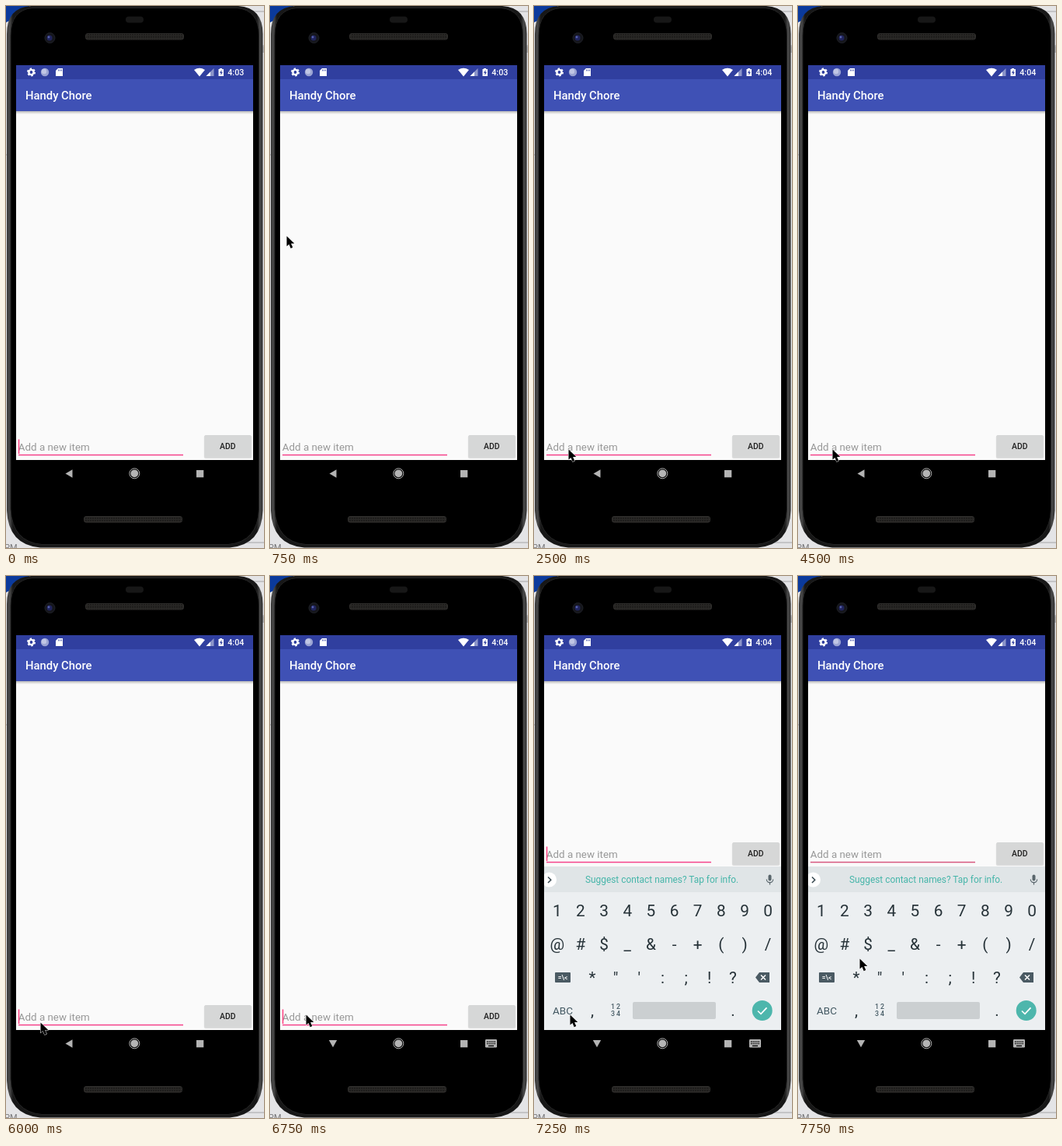
Write an HTML page that moves like this. It is 332 px wide and 696 px high and loops after 8000 ms.

```html
<!DOCTYPE html>
<html lang="en">
<head>
<meta charset="utf-8">
<title>Todo app on a phone</title>
<style>
  html, body { margin: 0; width: 100%; height: 100%; overflow: hidden; background: #e4e4e6; }
  svg { display: block; width: 332px; height: 696px; }
  text { font-family: Roboto, "Noto Sans", sans-serif; }
  .medium { font-weight: 500; }
  .key { font-size: 20.8px; fill: #263238; text-anchor: middle; }
  .hidden { visibility: hidden; }
</style>
</head>
<body>
<svg viewBox="0 0 332 696">
  <defs>
    <linearGradient id="rim" x1="0" x2="1" y1="0" y2="0">
      <stop offset="0" stop-color="#3a3a3a"/>
      <stop offset=".012" stop-color="#4a4a4a"/>
      <stop offset=".024" stop-color="#171717"/>
      <stop offset=".976" stop-color="#171717"/>
      <stop offset=".988" stop-color="#4a4a4a"/>
      <stop offset="1" stop-color="#303030"/>
    </linearGradient>
    <linearGradient id="shade" x1="0" x2="0" y1="0" y2="1">
      <stop offset="0" stop-opacity=".26"/>
      <stop offset="1" stop-opacity="0"/>
    </linearGradient>
    <pattern id="mesh" width="3" height="3" patternUnits="userSpaceOnUse">
      <rect width="3" height="3" fill="#292826"/>
      <rect width="2" height="1.5" fill="#1a1918"/>
    </pattern>
    <clipPath id="screen"><rect x="13" y="76" width="305" height="507"/></clipPath>
  </defs>

  <!-- desktop -->
  <rect width="332" height="696" fill="#e4e4e6"/>
  <path d="M0 0H30V8L0 21Z" fill="#0b3a9c"/>
  <path d="M290 7H332M328 51H332M0 191H4M290 689H332" stroke="#a4a4a6"/>
  <rect x="328" y="52" width="4" height="8" fill="#b8b8ba"/>
  <text x="-2" y="699" font-size="11" fill="#77777a">PM</text>

  <!-- phone -->
  <path id="body" d="M32 0H299Q330.500 2 330.500 36V648Q329 692 288 695.500H44Q3 692 1 648V36Q1 2 32 0Z" fill="url(#rim)"/>
  <path d="M34 2.500H297Q325.500 5 325.500 38V646Q324 688 286 691.500H46Q8 688 6 646V38Q6 5 34 2.500Z" fill="#000" stroke="#252525"/>
  <rect x="154" y="13.500" width="23" height="8" rx="4" fill="#171717"/>
  <rect x="102.500" y="35.500" width="126" height="7.500" rx="2.500" fill="url(#mesh)" stroke="#302f2d"/>
  <rect x="100.500" y="655.500" width="126" height="7.500" rx="2.500" fill="url(#mesh)" stroke="#302f2d"/>
  <circle cx="56.500" cy="41" r="6.500" fill="#15161b" stroke="#20222a"/>
  <circle cx="56" cy="41" r="3.500" fill="#20245c"/>
  <circle cx="55" cy="40" r="1.400" fill="#5661ad"/>

  <g clip-path="url(#screen)">
    <rect x="13" y="76" width="305" height="507" fill="#fafafa"/>
    <rect x="13" y="135" width="305" height="4" fill="url(#shade)"/>
    <rect x="13" y="94" width="305" height="41" fill="#3f51b5"/>
    <rect x="13" y="76" width="305" height="18" fill="#303f9f"/>
    <text class="medium" x="25" y="120.300" font-size="14.840" fill="#fff">Handy Chore</text>

    <!-- status icons -->
    <circle cx="32.500" cy="85" r="3.100" fill="none" stroke="#fff" stroke-width="2.400"/>
    <circle cx="32.500" cy="85" r="4.700" fill="none" stroke="#fff" stroke-width="1.600" stroke-dasharray="2.460"/>
    <circle cx="50" cy="85" r="5.200" fill="#9ba4d3"/>
    <circle cx="49" cy="84" r="3.200" fill="#c0c6e4"/>
    <path d="M67 80H73V90H64V83Z" fill="#fff"/>
    <path d="M67.500 81.500V83.500M69.500 81.500V83.500M71.500 81.500V83.500" stroke="#303f9f" stroke-width=".9"/>
    <path d="M242 82Q249 77.500 256 82L249 90.500Z" fill="#fff"/>
    <path d="M267.500 80V90H257.500Z" fill="#8c95c9"/>
    <path d="M263 84.500V90H257.500Z" fill="#fff"/>
    <path d="M275 80H278V81H280V90H273.500V81H275Z" fill="#fff"/>
    <path d="M277.400 82L275 86H276.500V89L278.800 85H277.400Z" fill="#303f9f"/>
    <text id="clock" class="medium" x="285.300" y="89" font-size="10.700" fill="#fff"></text>

    <!-- entry row -->
    <g id="entry">
      <text x="15.800" y="570.700" font-size="13.360" fill="#989898">Add a new item</text>
      <rect id="line" x="16" y="575.800" width="212" height="1.500"/>
      <rect id="caret" x="15.800" y="556.500" width="1.500" height="18.500" fill="#ff4081"/>
      <rect x="254.800" y="551.500" width="61.400" height="29.500" rx="2" fill="#000" opacity=".12"/>
      <rect x="255.500" y="551" width="60" height="28.500" rx="1.500" fill="#d6d7d7"/>
      <text class="medium" x="285.300" y="569" font-size="10.400" text-anchor="middle" fill="#1f1f1f">ADD</text>
    </g>

    <g id="keyboard">
      <rect x="13" y="373" width="305" height="212" fill="#eceff1"/>
      <rect x="13" y="373" width="305" height="33" fill="#e0e5e7"/>
      <circle cx="19.500" cy="390" r="9.500" fill="#fff"/>
      <path d="M18 386.500L21.800 390.200 18 394" fill="none" stroke="#37474f" stroke-width="1.500"/>
      <text x="66" y="394.300" font-size="11.880" fill="#45b5a9">Suggest contact names? Tap for info.</text>
      <rect x="301.500" y="383.500" width="4" height="8" rx="2" fill="#59666c"/>
      <path d="M299.300 389.500A4.200 4.200 0 0 0 307.700 389.500M303.500 393.700V396.500" fill="none" stroke="#59666c" stroke-width="1.200"/>

      <rect x="27" y="509" width="20" height="13" rx="1" fill="#4a5a63"/>
      <text class="medium" x="37" y="518.600" font-size="8.500" text-anchor="middle" fill="#fff">=\&lt;</text>
      <path d="M290 509H303V522H290L285 515.500Z" fill="#4a5a63"/>
      <path d="M292 512.500L298 518.500M298 512.500L292 518.500" stroke="#fff" stroke-width="1.500"/>

      <text x="24" y="562.800" font-size="13.500" fill="#455a64">ABC</text>
      <g class="medium" font-size="8.800" fill="#455a64">
        <text x="99" y="556.200">1</text><text x="106" y="556.200">2</text>
        <text x="99" y="565.200">3</text><text x="106" y="565.200">4</text>
      </g>
      <rect x="127" y="547" width="107" height="22" rx="2" fill="#cbcfd1"/>
      <circle cx="293.700" cy="558" r="13" fill="#4db6ac"/>
      <path d="M288 558.500L292 562.300 299.500 554.300" fill="none" stroke="#fff" stroke-width="1.700"/>
    </g>
  </g>

  <!-- navigation bar -->
  <g fill="#b4b4b4">
    <path id="back" d="M76.500 600.500L85.500 595.200V605.800Z"/>
    <path id="down" d="M75.800 596H86.200L81 605.300Z"/>
    <circle cx="165.300" cy="600.300" r="6.500" fill="none" stroke="#b4b4b4"/>
    <circle cx="165.300" cy="600.300" r="4.900"/>
    <rect x="245" y="596" width="9.300" height="9.300"/>
    <g id="switcher">
      <rect x="277" y="595" width="15" height="10.500" rx="1.200"/>
      <path d="M279 598H290.500M279 600.500H290.500" stroke="#000" stroke-width="1.300" stroke-dasharray="1.300 1.100"/>
      <path d="M281 603.400H288" stroke="#000" stroke-width="1.300"/>
    </g>
  </g>

  <path id="pointer" d="M.5 .5V13.600L3.500 10.900 5.700 16.200 8.300 15.100 6.100 10H10.300Z" fill="#000" stroke="#fff" stroke-width="1" paint-order="stroke"/>
</svg>
<script>
const LOOP = 8000;
const el = id => document.getElementById(id);
const show = (id, on) => el(id).classList.toggle("hidden", !on);
const latest = (steps, t) => steps.filter(s => s[0] <= t).pop();

// [ms, x, y] of the pointer tip
const moves = [
  [750, 21, 295], [1000, 50, 262], [1250, 80, 201], [1500, 79, 418],
  [1750, 51, 551], [2000, 42, 566], [2250, 44, 569], [6000, 44, 573],
  [6500, 46, 563], [7500, 44, 566], [7750, 79, 491]
];

const KEY_STEP = 30.15;
function addKeys(chars, x, y) {
  [...chars].forEach((char, i) => {
    if (char === " ") return;
    const key = document.createElementNS("http://www.w3.org/2000/svg", "text");
    key.setAttribute("class", "key");
    key.setAttribute("x", x + i * KEY_STEP);
    key.setAttribute("y", y);
    key.textContent = char;
    el("keyboard").append(key);
  });
}
addKeys("1234567890", 29.8, 436.5);
addKeys("@#$_&-+()/", 29.8, 479.5);
addKeys("*\"':;!?", 75, 523);
addKeys(",     .", 75, 564.5);

// The tap at 6750 restarts the blink.
function caretOn(t) {
  const since = t < 6750 ? t : Math.max(0, t - 7000);
  return Math.floor(since / 500) % 2 === 0;
}

function draw(t) {
  const tapped = t >= 6750, open = t >= 7000;
  const move = latest(moves, t);
  show("pointer", Boolean(move));
  if (move) el("pointer").setAttribute("transform", `translate(${move[1]} ${move[2]})`);

  show("caret", caretOn(t));
  show("back", !tapped);
  show("down", tapped);
  show("switcher", tapped);
  show("keyboard", open);
  el("keyboard").setAttribute("transform", `translate(0 ${t < 7250 ? 1 : 0})`);
  el("entry").setAttribute("transform", `translate(0 ${open ? -209 : 0})`);
  el("line").setAttribute("fill", t < 7500 ? "#f5438a" : "#d6587f");
  el("clock").textContent = t < 2250 ? "4:03" : "4:04";
}

const start = performance.now();
function tick() {
  draw((performance.now() - start) % LOOP);
  requestAnimationFrame(tick);
}
tick();
</script>
</body>
</html>
```
